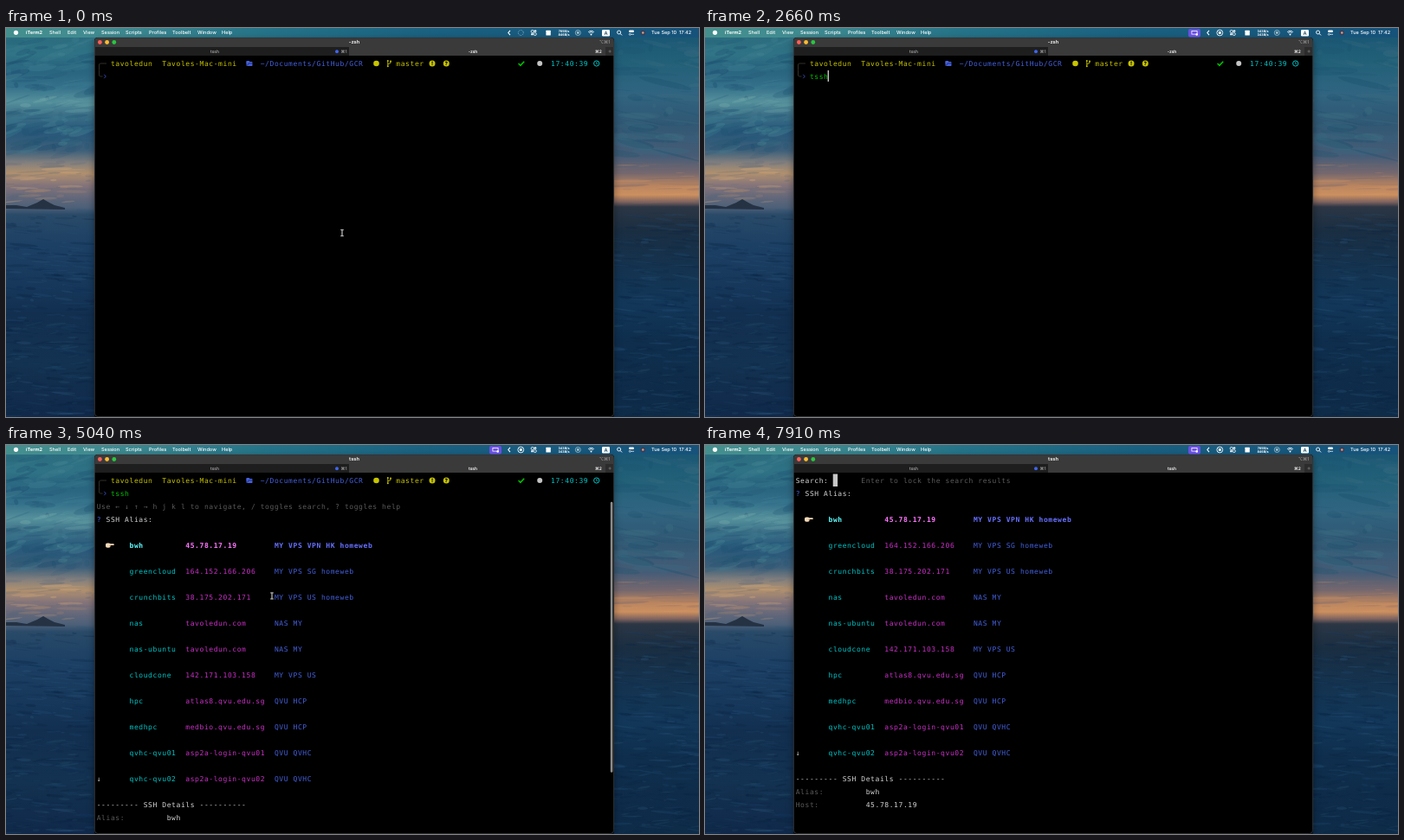
Animation, 800 px wide and 450 px high, one loop 8 s. Source, as an HTML page with a canvas:

```html
<!DOCTYPE html>
<html lang="en">
<head>
<meta charset="utf-8">
<title>SSH alias picker</title>
<style>
html, body { margin: 0; width: 100%; height: 100%; overflow: hidden; background: #000; }
canvas { display: block; width: 800px; height: 450px; }
</style>
</head>
<body>
<canvas id="stage"></canvas>
<script>
const LOOP = 8000, W = 800, H = 450;
const LEFT = 104.5, TOP = 41, CELL = 5.4, ROW = 15, ROWS = 27;
const MONO = '"DejaVu Sans Mono", "Liberation Mono", monospace';
const UI = 'Inter, "Open Sans", sans-serif';
const C = {
  yellow: '#c7c400', cyan: '#00c5c7', magenta: '#ca30c7', blue: '#4560dc', green: '#00c200',
  grey: '#5a5a5a', frame: '#46443c', text: '#d4d4d4',
  boldCyan: '#60fdff', boldMagenta: '#ff77ff', boldBlue: '#6871ff'
};
const HOSTS = [
  ['bwh', '45.78.17.19', 'MY VPS VPN HK homeweb'],
  ['greencloud', '164.152.166.206', 'MY VPS SG homeweb'],
  ['crunchbits', '38.175.202.171', 'MY VPS US homeweb'],
  ['nas', 'tavoledun.com', 'NAS MY'],
  ['nas-ubuntu', 'tavoledun.com', 'NAS MY'],
  ['cloudcone', '142.171.103.158', 'MY VPS US'],
  ['hpc', 'atlas8.qvu.edu.sg', 'QVU HCP'],
  ['medhpc', 'medbio.qvu.edu.sg', 'QVU HCP'],
  ['qvhc-qvu01', 'asp2a-login-qvu01', 'QVU QVHC'],
  ['qvhc-qvu02', 'asp2a-login-qvu02', 'QVU QVHC']
];
const DETAILS = [
  ['Alias:', 'bwh'], ['Host:', '45.78.17.19'], ['User:', 'root'],
  ['GroupLabels:', 'MY VPS VPN HK homeweb'], ['IdentityFile:', '~/.ssh/id_rsa']
];

const canvas = document.getElementById('stage');
const dpr = window.devicePixelRatio || 1;
canvas.width = W * dpr;
canvas.height = H * dpr;
let ctx = canvas.getContext('2d');

const clamp = v => Math.max(0, Math.min(1, v));

function rect(x, y, w, h, color, radius = 0) {
  ctx.fillStyle = color;
  ctx.beginPath();
  ctx.roundRect(x, y, w, h, radius);
  ctx.fill();
}
function disc(x, y, r, color) {
  ctx.fillStyle = color;
  ctx.beginPath();
  ctx.arc(x, y, r, 0, 7);
  ctx.fill();
}
function ring(x, y, r, color, width = 0.9) {
  ctx.strokeStyle = color;
  ctx.lineWidth = width;
  ctx.beginPath();
  ctx.arc(x, y, r, 0, 7);
  ctx.stroke();
}
function line(color, width, ...points) {
  ctx.strokeStyle = color;
  ctx.lineWidth = width;
  ctx.beginPath();
  points.forEach(([x, y]) => ctx.lineTo(x, y));
  ctx.stroke();
}
function label(text, x, y, size = 5.6, color = '#fff', weight = 500, align = 'left') {
  ctx.font = `${weight} ${size}px ${UI}`;
  ctx.textAlign = align;
  ctx.textBaseline = 'middle';
  ctx.fillStyle = color;
  ctx.fillText(text, x, y);
}
function gradient(x1, y1, stops) {
  const g = ctx.createLinearGradient(0, 0, x1, y1);
  stops.forEach(([pos, color]) => g.addColorStop(pos / (x1 || y1), color));
  return g;
}

// Wallpaper: an evening sky over the sea, with the menu bar tint, painted once.
function paintWallpaper() {
  let seed = 7;
  const rnd = () => (seed = (seed * 16807) % 2147483647) / 2147483647;
  const between = (a, b) => a + (b - a) * rnd();
  function streaks(count, x, y0, y1, colors, length, height, tilt) {
    for (let i = 0; i < count; i++) {
      ctx.globalAlpha = between(0.1, 0.36);
      ctx.fillStyle = colors[Math.floor(rnd() * colors.length)];
      ctx.beginPath();
      ctx.ellipse(between(x, x + 104), between(y0, y1), between(2, length),
        between(0.4, height), tilt * between(-0.3, 1.3), 0, 7);
      ctx.fill();
    }
    ctx.globalAlpha = 1;
  }
  rect(0, 0, 400, H, gradient(0, H, [[0, '#2a6a7c'], [30, '#2f7285'], [50, '#2a6580'], [68, '#34708a'],
    [85, '#56909c'], [100, '#3c7088'], [120, '#28587a'], [142, '#3e607a'], [156, '#84807e'], [168, '#b0906e'],
    [182, '#84747a'], [198, '#5f667a'], [208, '#4c6078'], [216, '#2a4a68'], [250, '#1c4064'], [300, '#16375a'],
    [330, '#122f50'], [390, '#133150'], [450, '#10294a']]));
  rect(400, 0, 400, H, gradient(0, H, [[0, '#185472'], [40, '#226078'], [75, '#306480'], [110, '#305874'],
    [148, '#465c76'], [168, '#76686e'], [182, '#b88460'], [193, '#cc9060'], [201, '#80645f'], [207, '#2c3644'],
    [235, '#1a2e42'], [280, '#143350'], [320, '#123759'], [360, '#0f2e4d'], [450, '#0e2b48']]));
  streaks(130, -2, 12, 148, ['#17486a', '#1d5270', '#4f8e98', '#3f8092', '#1f5574'], 22, 4.5, -0.3);
  streaks(20, -2, 74, 98, ['#7ab0ac', '#68a0a6'], 18, 2.5, -0.2);
  streaks(70, 700, 12, 150, ['#164c6a', '#1c526e', '#427386', '#3a6a82'], 34, 5, 0.2);
  streaks(60, -2, 150, 202, ['#dcae7a', '#546579', '#c89668', '#6a6d7c'], 18, 1.8, -0.08);
  streaks(30, 700, 152, 202, ['#d89a66', '#6a6470', '#8a6c68'], 36, 1.6, -0.04);
  for (const x of [-2, 700]) {
    streaks(260, x, 212, 450, ['#0a2140', '#0c2644', '#2a5478', '#1f4a70', '#0d2c50'], 17, 1.7, 0.12);
    streaks(60, x, 340, 450, ['#2c5672', '#0a2340', '#24506e'], 12, 1.4, -0.2);
  }
  ctx.fillStyle = '#253244';
  ctx.beginPath();
  [[0, 209], [0, 205], [12, 205], [24, 207], [36, 202], [43, 198], [50, 202], [56, 205], [68, 208], [68, 210]]
    .forEach(([x, y]) => ctx.lineTo(x, y));
  ctx.fill();
  rect(0, 0, W, 11, gradient(W, 0, [[0, '#458f8e'], [120, '#3f8a90'], [300, '#257388'], [500, '#1a6080'], [800, '#16527a']]));
}

const wallpaper = document.createElement('canvas');
wallpaper.width = canvas.width;
wallpaper.height = canvas.height;
const screenCtx = ctx;
ctx = wallpaper.getContext('2d');
ctx.scale(dpr, dpr);
paintWallpaper();
ctx = screenCtx;
ctx.scale(dpr, dpr);
ctx.textRendering = 'geometricPrecision';

function drawMenuBar(t) {
  disc(11.5, 5.3, 2.6, '#fff');
  label('iTerm2', 23, 5.4, 5.6, '#fff', 700);
  [['Shell', 50], ['Edit', 71], ['View', 89], ['Session', 110], ['Scripts', 138], ['Profiles', 165],
    ['Toolbelt', 192], ['Window', 221], ['Help', 249]].forEach(([name, x]) => label(name, x, 5.4));

  const recording = t >= 210;
  if (recording) {
    rect(558, 1, 14, 9.5, '#6a50e2', 2);
    rect(561.5, 3, 7, 4.6, '#fff', 0.6);
    rect(562.3, 3.8, 5.4, 3, '#6a50e2');
    disc(567.7, 7.5, 1.3, '#fff');
    ring(594.3, 5.5, 3.4, '#fff');
    rect(592.9, 4.1, 2.8, 2.8, '#fff', 0.4);
  } else {
    ctx.setLineDash([0.8, 1.1]);
    ring(594.3, 5.5, 3, '#b8d0da', 0.8);
    ctx.setLineDash([]);
  }
  line('#fff', 1.1, [582, 2.8], [579.8, 5.5], [582, 8.2]);
  ring(607.7, 4, 1.6, '#fff', 0.8);
  ring(610.7, 7, 1.6, '#fff', 0.8);
  rect(609.5, 2.4, 2.8, 2, '#fff', 0.5);
  rect(606.2, 6.3, 2.4, 2, '#fff', 0.5);
  rect(623.4, 2.8, 5.4, 5.8, '#fff', 0.5);
  const busy = t < 560 || t >= 7910;
  const rates = busy ? ['765B/s', '846B/s'] : ['343B/s', '343B/s'];
  rates.forEach((rate, i) => label(rate, 644, 3.4 + i * 4.3, 3.7, '#fff', 700, 'center'));
  ring(660.3, 5.5, 3, '#a9c4cf', 0.8);
  disc(660.3, 5.5, 1.4, '#a9c4cf');
  [3.9, 2.4].forEach(r => {
    ctx.strokeStyle = '#fff';
    ctx.lineWidth = 0.9;
    ctx.beginPath();
    ctx.arc(675.5, 8, r + 0.8, -2.35, -0.8);
    ctx.stroke();
  });
  disc(675.5, 7.5, 1, '#fff');
  rect(688, 2, 9, 7.5, '#fff', 1.2);
  label('A', 692.5, 5.9, 5.6, '#1b4a60', 600, 'center');
  ring(707.6, 5, 2, '#fff');
  line('#fff', 1, [709, 6.4], [711, 8.4]);
  rect(719, 2.5, 6, 2.6, '#fff', 1.3);
  ring(720.3, 7.3, 1, '#fff', 0.6);
  line('#fff', 0.7, [721, 7.3], [725, 7.3]);
  disc(735.3, 5.5, 2.9, '#3a3f58');
  disc(735.3, 5.5, 1.2, '#d9a58a');
  label('Tue Sep 10', 745, 5.4);
  label('17:42', 777, 5.4);
}

function drawWindow(title) {
  ctx.save();
  ctx.shadowColor = 'rgba(0,0,0,.4)';
  ctx.shadowBlur = 9 * dpr;
  ctx.shadowOffsetY = 3 * dpr;
  rect(102, 11, 600, 439, '#000', 4);
  ctx.restore();
  rect(102.5, 11.5, 599, 20.5, '#3a3a3a', [4, 4, 0, 0]);
  rect(102.5, 22, 293.5, 10, '#1e1e1e');
  rect(692, 22, 9.5, 10, '#2c2c2c');
  rect(102.5, 32, 599, 417.5, '#000');
  ctx.strokeStyle = '#42464a';
  ctx.lineWidth = 0.7;
  ctx.beginPath();
  ctx.roundRect(102.4, 11.4, 599.2, 438.2, 4);
  ctx.stroke();
  ['#ff5f57', '#febc2e', '#28c840'].forEach((color, i) => disc(108.4 + i * 8.2, 16.5, 2.4, color));
  label(title, 402, 16.6, 5.6, '#e8e8e8', 700, 'center');
  label('⌥⌘1', 691, 16.6, 5.2, '#9a9a9a', 500, 'center');
  label('tssh', 241, 27.3, 4.9, '#b5b5b5', 500, 'center');
  label('⌘1', 390, 27.3, 4.9, '#b5b5b5', 500, 'center');
  disc(382, 27.2, 2, '#3f66ee');
  label(title, 539, 27.3, 4.9, '#fff', 600, 'center');
  label('⌘2', 684, 27.3, 4.9, '#fff', 600, 'center');
  label('+', 697, 26.8, 7, '#8a8a8a', 400, 'center');
}

const colX = col => LEFT + col * CELL;

function put(col, y, text, color, bold) {
  ctx.font = `${bold ? 'bold ' : ''}8px ${MONO}`;
  ctx.textAlign = 'left';
  ctx.textBaseline = 'alphabetic';
  ctx.fillStyle = color;
  [...text].forEach((char, i) => {
    if (char !== ' ') ctx.fillText(char, colX(col + i) + 0.2, y + 2.9);
  });
}
function badge(x, y, sign) {
  disc(x, y, 3.5, C.yellow);
  label(sign, x, y + 0.2, 6, '#000', 800, 'center');
}
function promptHead(y, time) {
  line(C.frame, 0.7, [107.5, y + 7.5], [107.5, y + 1], [108.5, y], [116, y]);
  put(3, y, 'tavoledun', C.yellow);
  put(14, y, 'Tavoles-Mac-mini', C.yellow);
  rect(277.5, y - 3, 3.6, 3, C.blue, 0.5);
  rect(277.5, y - 2, 7, 5, C.blue, 0.7);
  line('#000', 0.5, [278.5, y + 2.5], [280, y - 0.1], [286, y - 0.1]);
  put(35, y, '~/Documents/GitHub/GCR', C.blue);
  disc(427.5, y, 3.3, C.yellow);
  line(C.yellow, 0.9, [440.8, y - 2.5], [440.8, y + 2.8]);
  line(C.yellow, 0.9, [444, y - 2.3], [444, y - 0.6], [440.8, y + 1]);
  [[440.8, -3], [444, -2.5], [440.8, 3.2]].forEach(([x, dy]) => disc(x, y + dy, 1, C.yellow));
  put(64, y, 'master', C.yellow);
  badge(492, y, '!');
  badge(508.3, y, '?');
  if (!time) return;
  line(C.green, 1.6, [591.6, y], [593.9, y + 2.3], [598.2, y - 2.3]);
  disc(616.2, y, 3, '#c4c4c4');
  put(97.1, y, time, C.cyan);
  ring(681.7, y, 3.1, C.cyan, 1);
  line(C.cyan, 0.8, [681.7, y - 1.8], [681.7, y + 0.3], [683, y + 0.8]);
}
function promptTail(y, command) {
  line(C.frame, 0.7, [107.5, y - 7.5], [107.5, y - 1], [108.5, y], [111.5, y]);
  line('#3a50c0', 0.9, [113.3, y - 2.2], [115.3, y], [113.3, y + 2.2]);
  put(3, y, command, C.green);
}
function hand(x, y) {
  rect(x, y - 2.6, 5.6, 5.4, '#f2d9b8', 1.8);
  rect(x + 3, y - 1.8, 6.8, 1.9, '#f2d9b8', 0.9);
  line('#b08a60', 0.5, [x + 4, y + 0.3], [x + 6, y + 0.3]);
}

function drawTerminal(s) {
  const at = (row, draw) => {
    const r = row - s.scroll;
    if (r >= 0 && r < ROWS) draw(TOP + r * ROW);
  };
  at(-3, y => promptHead(y));
  at(-2, y => promptHead(y, '15:56:23'));
  at(-1, y => promptTail(y, 'cl'));
  at(0, y => promptHead(y, '17:40:39'));
  at(1, y => promptTail(y, s.command));
  if (s.cursor) at(1, y => rect(colX(3 + s.command.length) - 0.7, y - 7, 1.4, 13, '#c7c7c7'));
  if (!s.listed) return;

  at(2, y => {
    if (s.searching) {
      put(0, y, 'Search:', C.text);
      rect(147.7, y - 7.5, 5.4, 14.5, '#c7c7c7');
      put(14, y, 'Enter to lock the search results', C.grey);
    } else {
      put(0, y, 'Use ← ↓ ↑ → h j k l to navigate, / toggles search, ? toggles help', C.grey);
    }
  });
  at(3, y => {
    put(0, y, '?', C.blue);
    put(2, y, 'SSH Alias:', C.text);
  });
  HOSTS.forEach(([alias, host, groups], i) => at(5 + i * 2, y => {
    const first = i === 0;
    if (first) hand(115, y);
    if (i === HOSTS.length - 1) put(0, y, '↓', C.text);
    put(7, y, alias, first ? C.boldCyan : C.cyan, first);
    put(19, y, host, first ? C.boldMagenta : C.magenta, first);
    put(38, y, groups, first ? C.boldBlue : C.blue, first);
  }));
  at(25, y => put(0, y, '--------- SSH Details ----------', C.text));
  DETAILS.slice(0, s.searching ? 2 : 5).forEach(([name, value], i) => at(26 + i, y => {
    put(0, y, name, C.grey);
    put(15, y, value, C.text);
  }));
  if (s.barAlpha > 0) {
    ctx.globalAlpha = s.barAlpha;
    rect(697.8, 31 + (s.scroll + 3) / 36 * 418, 2.6, 313, '#8c8c8c', 1.3);
    ctx.globalAlpha = 1;
  }
}

function drawPointer(x, y) {
  const beam = (color, width) => {
    line(color, width, [x - 1.7, y - 3.5], [x + 1.7, y - 3.5]);
    line(color, width, [x, y - 3.5], [x, y + 3.5]);
    line(color, width, [x - 1.7, y + 3.5], [x + 1.7, y + 3.5]);
  };
  beam('#444', 1.7);
  beam('#cfcfcf', 0.8);
}

function stateAt(t) {
  const listed = t >= 3430, searching = t >= 6300;
  const keys = [2100, 2240, 2450, 2660].filter(k => t >= k).length;
  let scroll = 0;
  if (searching) scroll = 2;
  else if (t >= 5040) scroll = -Math.round(3 * clamp((t - 5040) / 350));
  else if (listed) scroll = 6;
  const blinkOn = (t >= 70 && t < 700) || (t >= 1190 && t < 1820) || t >= 2100;
  return {
    listed, searching, scroll,
    command: 'tssh'.slice(0, keys),
    cursor: !listed && blinkOn,
    barAlpha: t >= 5040 && !searching ? clamp((5880 - t) / 280) : 0,
    title: t < 3430 ? '-zsh' : t < 3850 ? 'osascript' : 'tssh'
  };
}

function frame(now) {
  const t = now % LOOP, s = stateAt(t);
  ctx.drawImage(wallpaper, 0, 0, W, H);
  drawWindow(s.title);
  drawTerminal(s);
  drawMenuBar(t);
  if (t < 2100) {
    const p = clamp((t - 70) / 490), ease = p * p * (3 - 2 * p);
    drawPointer(388 - 81 * ease, 237 - 68 * ease);
  } else if (t >= 5040 && t < 6300) {
    drawPointer(307, 174.5);
  }
  requestAnimationFrame(frame);
}
requestAnimationFrame(frame);
</script>
</body>
</html>
```
